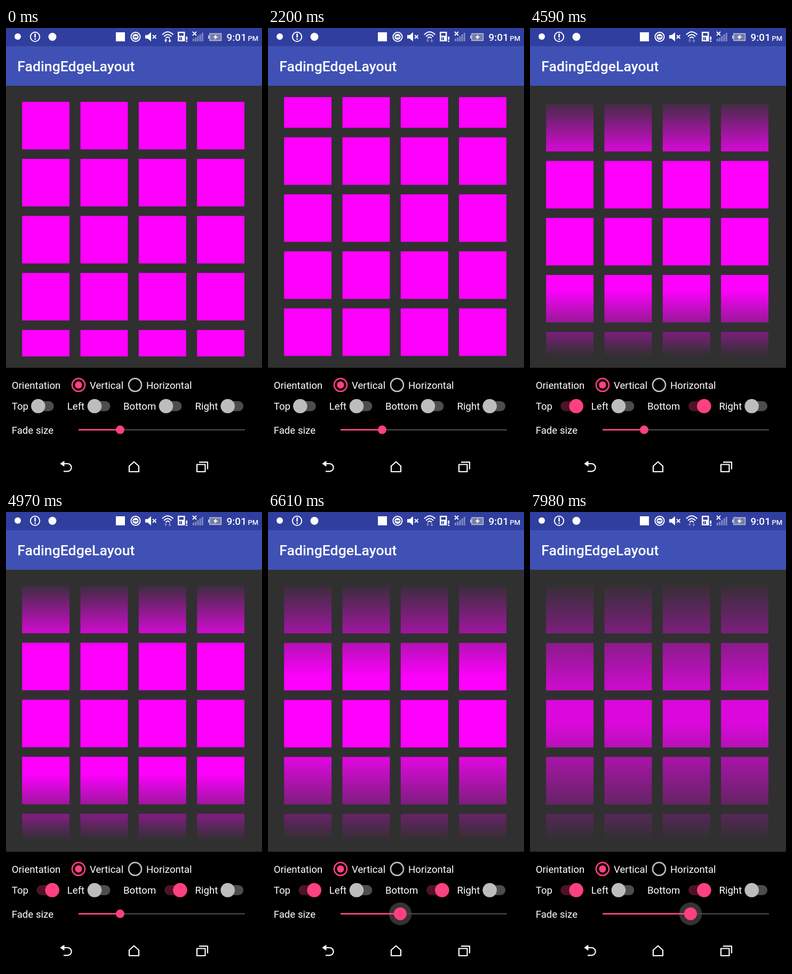
Write an HTML page with a canvas that moves like this. It is 480 by 853 pixels and loops after 8000 ms.

```html
<!DOCTYPE html>
<html lang="en">
<head>
<meta charset="utf-8">
<title>FadingEdgeLayout</title>
<style>
html, body { margin: 0; width: 100%; height: 100%; overflow: hidden; background: #000; }
canvas, svg { position: absolute; left: 0; top: 0; width: 480px; height: 853px; }
text { font-family: Roboto, sans-serif; fill: #fff; }
.label { font-size: 18.67px; }
.line { fill: none; stroke: #fff; stroke-width: 2; }
.nav { fill: none; stroke: #fff; stroke-width: 2.2; stroke-linejoin: round; }
</style>
</head>
<body>
<canvas id="grid" width="480" height="853"></canvas>
<svg id="ui" viewBox="0 0 480 853">
  <rect width="480" height="33.3" fill="#303f9f"/>
  <rect y="33.3" width="480" height="74.7" fill="#3f51b5"/>
  <rect y="635.6" width="480" height="218" fill="#000"/>

  <g id="status" fill="#fff">
    <circle cx="22" cy="16" r="6"/>
    <circle class="line" cx="54.5" cy="16.5" r="8.7"/>
    <path d="M53.3 10.5h2.6v7.2h-2.6zM53.3 19.5h2.6v2.6h-2.6z"/>
    <circle cx="87" cy="16.5" r="7.5"/>
    <rect x="206" y="8" width="17" height="17"/>
    <circle class="line" cx="243" cy="16.5" r="8.6"/>
    <circle cx="243" cy="16.5" r="5.6"/>
    <rect x="239.5" y="15.4" width="7" height="2.2" fill="#303f9f"/>
    <path d="M261 13.2h4.5l6.5-5.2v17l-6.5-5.2H261z"/>
    <path class="line" d="M275 13.2l6.5 6.5m0-6.5l-6.5 6.5"/>
    <path class="line" d="M293 12.5q10-10.5 20.5 0M296.2 16q6.8-7.5 14 0M299.4 19q3.7-4 7.5 0"/>
    <path id="arrows" d="M299.5 20l3 3.5h-2v3h-2v-3h-2zM307 27l-3-3.5h2v-3h2v3h2z"/>
    <path d="M322 7h13.5v18H322zM324.5 9.5v5h8.5v-5zM325 17v6h2v-6zm3 0v6h2v-6z" fill-rule="evenodd"/>
    <path d="M337.5 16h2.6v6h-2.6zM337.5 23.5h2.6v2.5h-2.6z"/>
    <path class="line" d="M350 7l7 7m0-7l-7 7"/>
    <path d="M350 20h3v5h-3zM354.2 18h3v7h-3zM358.4 15h3v10h-3zM362.6 12h3v13h-3zM366.8 9h3v16h-3z" fill="#7f88c0"/>
    <rect x="382" y="10.5" width="21.5" height="13" fill="#757ca8" stroke="#c4c8de" stroke-width="1.4"/>
    <rect x="379" y="14" width="2.5" height="6" fill="#c4c8de"/>
    <path d="M394.5 11.5l-6 6.5h4l-2 4.5 7-6.5h-4.2z"/>
    <text x="413.5" y="24" font-size="19" font-weight="500">9:01</text>
    <text x="453.5" y="24" font-size="13" font-weight="500">PM</text>
  </g>
  <text x="21.3" y="81" font-size="26.67" font-weight="500">FadingEdgeLayout</text>

  <g class="label">
    <text x="10.7" y="675">Orientation</text>
    <text x="157" y="675">Vertical</text>
    <text x="263" y="675">Horizontal</text>
    <text x="10.7" y="759">Fade size</text>
  </g>
  <g fill="none" stroke-width="2.67">
    <circle cx="136" cy="667.7" r="12" stroke="#ff4081"/>
    <circle cx="136" cy="667.7" r="6.7" fill="#ff4081"/>
    <circle cx="242" cy="667.7" r="12" stroke="#bdbdbd"/>
  </g>
  <g id="switches"></g>

  <g id="seek">
    <circle id="halo" cy="751.6" r="21.3" fill="#333"/>
    <path d="M136 751.6H448" stroke="#4a4a4a" stroke-width="2.2"/>
    <path id="filled" stroke="#ff4081" stroke-width="2.6"/>
    <circle id="knob" cy="751.6" fill="#ff4081"/>
  </g>

  <g class="nav">
    <path d="M107 815h8.5a7.2 7.2 0 0 1 0 14.4H108"/>
    <path d="M102 815l7-4.8v9.6z" fill="#fff" stroke-width="1"/>
    <path d="M231 819.5l9-8 9 8V830h-18z"/>
    <path d="M358 816.5h15.5V830H358zM362 812.2h16V825.5"/>
  </g>
</svg>
<script>
const LOOP = 8000;
const TOP = 129.3, BOTTOM = 614.4;
const CELL = 88.9, ROW = 106.67, COL = 109.33;
const FADE_PER_PX = 1.615;
const NS = 'http://www.w3.org/2000/svg';

// Tables of [time, value]
const SCROLL = [
  [1080, 0], [1240, 24], [1420, 97.8], [1600, 200], [1800, 290], [2000, 340], [2200, 360.4],
  [4440, 360.4], [4590, 316.9], [4760, 210], [4960, 110], [5200, 45], [5400, 12], [5580, 0]
];
const SEEK = [
  [5760, 214], [6000, 221], [6300, 238], [6600, 248], [6700, 248],
  [7000, 270], [7300, 288], [7550, 295], [7800, 295], [7975, 301]
];

const $ = id => document.getElementById(id);
const ctx = $('grid').getContext('2d');
const clamp = v => Math.max(0, Math.min(1, v));
const ramp = (t, from, to) => clamp((t - from) / (to - from));
const smooth = p => p * p * (3 - 2 * p);
const mix = (a, b, p) => a + (b - a) * p;

function at(table, t) {
  if (t <= table[0][0]) return table[0][1];
  for (let i = 1; i < table.length; i++) {
    const [t1, v1] = table[i], [t0, v0] = table[i - 1];
    if (t <= t1) return mix(v0, v1, ramp(t, t0, t1));
  }
  return table[table.length - 1][1];
}

function set(el, attrs) {
  for (const k in attrs) el.setAttribute(k, attrs[k]);
  return el;
}

function add(parent, tag, attrs) {
  return parent.appendChild(set(document.createElementNS(NS, tag), attrs));
}

function makeSwitch(label, textX, x, press, end) {
  const box = $('switches');
  const ripple = add(box, 'circle', { cy: 707.3, fill: '#333' });
  add(box, 'text', { x: textX, y: 714, class: 'label' }).textContent = label;
  const track = add(box, 'rect', { x: x - 3, y: 698, width: 32.4, height: 18.7, rx: 9.3 });
  const thumb = add(box, 'circle', { cy: 707.3, r: 13.3 });
  return { x, press, end, ripple, track, thumb };
}

const switches = [
  makeSwitch('Top', 10.7, 60.3, 2450, 3150),
  makeSwitch('Left', 114.7, 166, Infinity, Infinity),
  makeSwitch('Bottom', 220, 300, 3980, 4500),
  makeSwitch('Right', 354.5, 415.7, Infinity, Infinity)
];
const isOn = (s, t) => t >= s.press + 120;

function drawSwitch(s, t) {
  const on = isOn(s, t);
  const cx = s.x + 26.4 * (on ? smooth(ramp(t, s.press + 120, s.press + 370)) : 0);
  const active = t > s.press && t < s.end;
  set(s.thumb, { cx, fill: on ? '#ff4081' : '#bdbdbd' });
  set(s.track, { fill: on ? '#4d1327' : '#4d4d4d' });
  set(s.ripple, {
    cx,
    r: active ? mix(12, 26.7, ramp(t, s.press, s.press + 200)) : 0,
    opacity: active ? 1 - ramp(t, s.press + 250, s.end) : 0
  });
}

function drawGrid(t, scroll, fade) {
  const fadeTop = isOn(switches[0], t), fadeBottom = isOn(switches[2], t);
  ctx.globalAlpha = 1;
  ctx.fillStyle = '#303030';
  ctx.fillRect(0, 100, 480, 540);
  ctx.fillStyle = '#f0f';
  for (let y = 129; y < 615; y++) {
    const low = Math.max(y, TOP), high = Math.min(y + 1, BOTTOM);
    const first = Math.floor((y - TOP + scroll) / ROW);
    const top = TOP + 8.9 + first * ROW - scroll;
    let alpha = clamp(Math.min(high, top + CELL) - Math.max(low, top));
    if (fadeTop) alpha *= clamp((y + 0.5 - TOP) / fade);
    if (fadeBottom) alpha *= clamp((BOTTOM - y - 0.5) / fade);
    ctx.globalAlpha = alpha;
    for (let c = 0; c < 4; c++) ctx.fillRect(30.2 + c * COL, y, CELL, 1);
  }
}

function drawSeek(t, x) {
  const press = smooth(ramp(t, 5640, 5800));
  set($('knob'), { cx: x, r: mix(8, 12, press) });
  set($('halo'), { cx: x, r: mix(8, 21.3, press), opacity: press });
  set($('filled'), { d: `M136 751.6H${x}` });
}

function draw(t) {
  const x = at(SEEK, t);
  drawGrid(t, at(SCROLL, t), (x - 136) * FADE_PER_PX);
  switches.forEach(s => drawSwitch(s, t));
  drawSeek(t, x);
  set($('arrows'), { fill: t < 1890 ? '#fff' : '#7f88c0' });
}

const start = performance.now();
function tick() {
  draw((performance.now() - start) % LOOP);
  requestAnimationFrame(tick);
}
tick();
</script>
</body>
</html>
```
